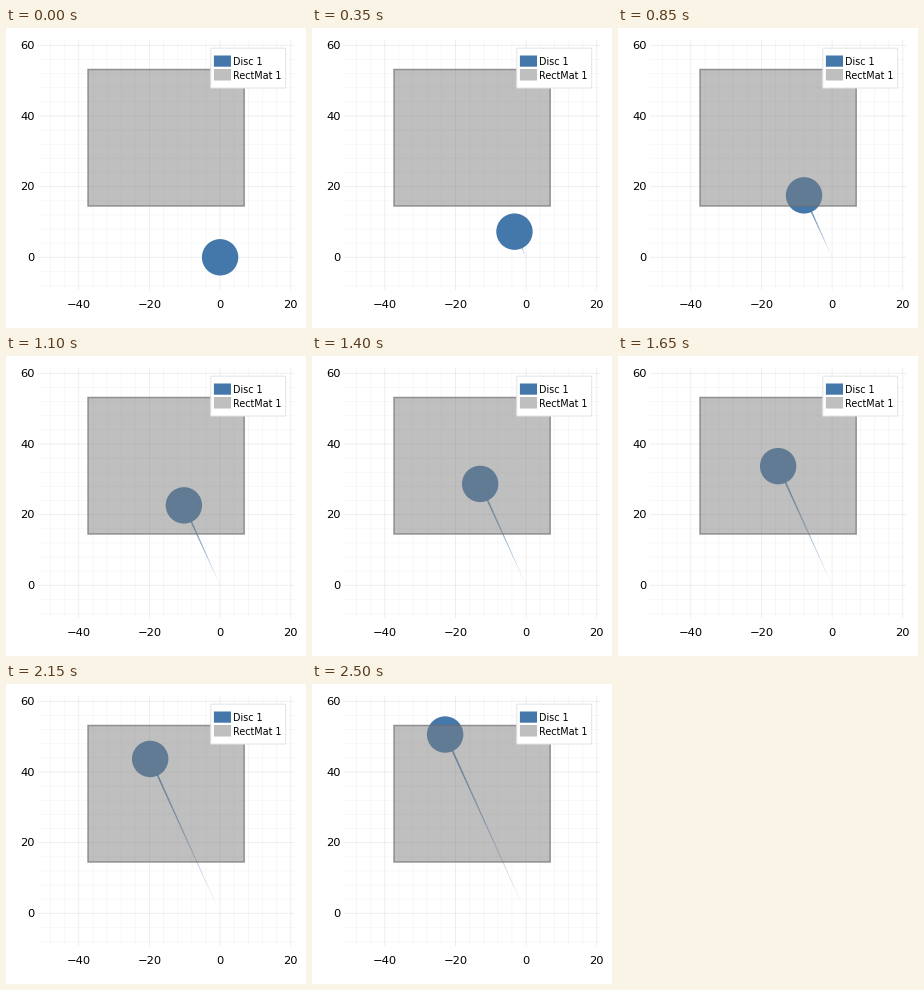
These frames come from a looping animation (300x300 px, 2550 ms). A matplotlib script:

```python
import matplotlib.pyplot as plt
import numpy as np
from matplotlib.animation import FuncAnimation
from matplotlib.collections import LineCollection
from matplotlib.colors import to_rgba
from matplotlib.patches import Circle, Rectangle

SIZE, DPI = 300, 100
FRAMES, INTERVAL = 51, 50
PT = 72 / DPI                      # points per pixel
BLUE, GREY = "#4477aa", "#808080"
SCALE, X0, Y0 = 3.533, 214.1, 229.3  # pixels per unit, origin in pixels
LEFT, RIGHT, TOP, BOTTOM = 32.5, 288, 12, 261.5

plt.rcParams["font.family"] = "DejaVu Sans"
fig = plt.figure(figsize=(SIZE / DPI, SIZE / DPI), dpi=DPI, facecolor="white")
ax = fig.add_axes([0, 0, 1, 1])
ax.set_xlim(0, SIZE)
ax.set_ylim(SIZE, 0)
ax.axis("off")


def px(x):
    return X0 + SCALE * x


def py(y):
    return Y0 - SCALE * y


def label(x, y, text, size, ha):
    ax.text(x, y, text, fontsize=size * PT, ha=ha, va="baseline", zorder=9)


def box(x0, y0, x1, y1, **style):
    ax.add_patch(Rectangle((x0, y0), x1 - x0, y1 - y0, snap=False, **style))


def grid_line(xs, ys, major):
    ax.plot(xs, ys, color="black", alpha=0.07 if major else 0.03,
            lw=0.9 * PT, snap=False, zorder=1)


def draw_grid():
    for x in range(-48, 21, 4):
        grid_line([px(x)] * 2, [TOP, BOTTOM], x % 20 == 0)
    for y in range(-8, 61, 4):
        grid_line([LEFT, RIGHT], [py(y)] * 2, y % 20 == 0)
    for x in range(-40, 21, 20):
        label(px(x), 280.4, str(x).replace("-", "\u2212"), 11.5, "center")
    for y in range(0, 61, 20):
        label(28.5, py(y) + 3.8, str(y), 11.5, "right")


def draw_mat():
    box(82, 41.5, 238.2, 178, fc=to_rgba(GREY, 0.5), ec="none", zorder=4)
    box(82, 41.5, 238.2, 178, fc="none", ec=to_rgba("#707070", 0.7),
        lw=1.5 * PT, zorder=5)


def draw_legend():
    box(204.8, 20.2, 279.7, 60, fc="white", ec="#e4e4e4", lw=PT, zorder=7)
    box(207.9, 27.5, 225, 38.7, fc=BLUE, ec="none", zorder=8)
    box(207.9, 41, 225, 52.5, fc="#bfbfbf", ec="none", zorder=8)
    label(227, 37.3, "Disc 1", 9.7, "left")
    label(227, 50.9, "RectMat 1", 9.6, "left")


def position(k):
    """Disc centre after k steps, slowed slightly by friction."""
    rise = 3.68 * k - 0.0021 * k * k
    return np.column_stack([X0 - 0.453 * rise, Y0 - rise])


draw_grid()
draw_mat()
draw_legend()
trail = ax.add_collection(LineCollection([], zorder=2, capstyle="butt"))
disc = ax.add_patch(Circle((X0, Y0), 18.2, fc=BLUE, ec="none", zorder=3))


def update(frame):
    path = position(np.arange(frame + 1))
    disc.center = tuple(path[-1])
    fade = np.linspace(0, 1, frame + 1)[1:] ** 0.75
    trail.set_segments(list(np.stack([path[:-1], path[1:]], axis=1)))
    trail.set_linewidths(1.8 * PT * fade if frame else [0])
    trail.set_colors([to_rgba(BLUE, a) for a in fade])
    return trail, disc


anim = FuncAnimation(fig, update, frames=FRAMES, interval=INTERVAL,
                     repeat=True, repeat_delay=0)
plt.show()
```
